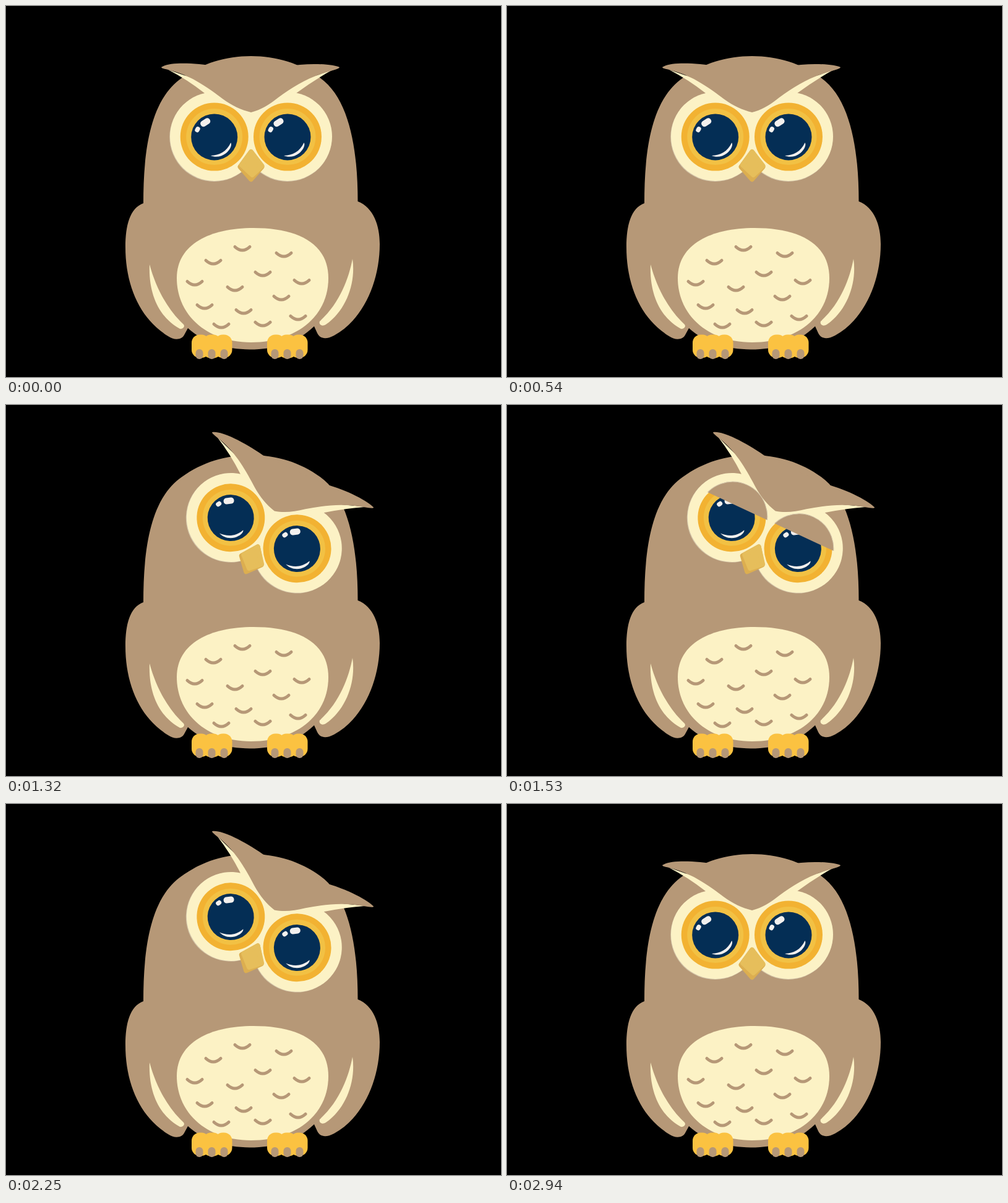
An HTML page for the animation above (3600 ms loop, 800 by 600 pixels).

```html
<!DOCTYPE html>
<html lang="en">
<head>
<meta charset="utf-8">
<title>Owl</title>
<style>
  html, body { margin: 0; width: 100%; height: 100%; overflow: hidden; background: #000; }
  svg { display: block; width: 100vw; height: 100vh; }
  .brown { fill: #b69877; }
  .cream { fill: #fcf2c5; }
  .rim { fill: #d3c4a9; }
  .foot { fill: #fbc241; }
  .shine { fill: #f3f0ee; }
  .plume { fill: none; stroke: #b69877; stroke-width: 5; stroke-linecap: round; }
  .lid { fill: #b69877; stroke: #d3c4a9; stroke-width: 1; }
  .beak { stroke-width: 8; stroke-linejoin: round; }
</style>
</head>
<body>
<svg viewBox="0 0 800 600">
  <defs>
    <clipPath id="lidClip"><rect id="lidRect" x="270" y="152" width="250" height="0"/></clipPath>
    <g id="eye">
      <circle r="55" fill="#f2b232"/>
      <circle r="45.5" fill="#f2c144"/>
      <circle cy="0.3" r="37.5" fill="#042e55"/>
      <rect class="shine" x="-8.5" y="-5" width="17" height="10" rx="4.6" transform="translate(-14.5 -23.4) rotate(-33)"/>
      <rect class="shine" x="-3.6" y="-4.6" width="7.200" height="9.200" rx="3.4" transform="translate(-27.200 -11.900) rotate(30)"/>
      <path class="shine" d="M-6 30.5C8 30 20 24 26.5 9.5C29 13 26 20.500 19 26.500C11 33 1 33.500 -6 30.500Z"/>
    </g>
    <g id="foot">
      <rect class="foot" x="300" y="531.500" width="29" height="37.500" rx="13"/>
      <rect class="foot" x="318" y="531.500" width="30" height="38" rx="13"/>
      <rect class="foot" x="337" y="531.500" width="28.500" height="37.500" rx="13"/>
      <rect class="brown" x="306.500" y="555" width="12" height="16" rx="5.800"/>
      <rect class="brown" x="326.500" y="555" width="12" height="16" rx="5.800"/>
      <rect class="brown" x="346.500" y="555" width="12" height="16" rx="5.800"/>
    </g>
  </defs>
  <rect width="800" height="600"/>

  <path class="brown" d="M222 319C222 240 231 153 284 116.500C317 92.500 355 81 396 81C437 81 475 92.500 508 116.500
    C556 151 568.500 235 568.500 316C594 326 604 355 604 385C604 445 578 507 530 533
    C517 540 507 538 503 529L498 518C470 545 435 555.500 394 555.500C355 555 320 545 294 521L288 532
    C284 540 272 541 262 534C215 505 193 450 193 390C193 355 200 327 222 319Z"/>
  <path class="cream" d="M400 359C470 359 521 383 521 440C521 505 465 544 396 544C325 544 276 500 276 440C276 385 330 359 400 359Z"/>
  <path class="cream" d="M232 418C242 455 260 490 287 515C290 519 285 523 281 522C250 505 230 470 232 418Z"/>
  <path class="cream" d="M560 409C554 440 540 480 507 510C505 515 511 519 517 515C548 494 566 450 560 409Z"/>
  <g id="plumes"></g>
  <use href="#foot"/>
  <use href="#foot" x="122"/>

  <g id="face">
    <path class="cream" d="M262 103Q293 119 321 141L396 185L469 141Q499 119 528 103L396 150Z"/>
    <circle class="rim" cx="336.300" cy="212" r="72"/>
    <circle class="rim" cx="454.500" cy="212" r="72"/>
    <circle class="cream" cx="337" cy="211" r="72"/>
    <circle class="cream" cx="455" cy="211" r="72"/>
    <use href="#eye" x="336.700" y="211.600"/>
    <use href="#eye" x="455" y="211.600"/>
    <g clip-path="url(#lidClip)">
      <circle class="lid" cx="337" cy="209" r="56"/>
      <circle class="lid" cx="455.900" cy="210.700" r="56"/>
    </g>
    <path class="brown" d="M251 99C262 91 300 91 341 98L451 98C490 91 528 94 539 99C539 101 532 103 525 105
      C490 114 465 130 440 148C425 160 412 168 396 172C380 168 365 161 350 150C330 135 300 112 265 104C258 102 251 101 251 99Z"/>
    <path class="beak" fill="#dcae50" stroke="#dcae50" d="M396 236L413.500 260L396 280L378.500 260Z"/>
    <path class="beak" fill="#e6be5b" stroke="#e6be5b" d="M396 236L413.500 258.500L398 273L381 257Z"/>
  </g>
</svg>
<script>
  const LOOP = 3600, STEP = 30;
  const LID_HEIGHT = 116, TILT = 25;
  const face = document.getElementById('face');
  const lidRect = document.getElementById('lidRect');

  const plumes = [[382, 391], [335, 413], [449, 401], [415, 432], [305, 447], [370, 456], [478, 445],
    [445, 471], [321, 485], [384, 493], [348, 516], [415, 513], [472, 503]];
  document.getElementById('plumes').innerHTML = plumes.map(([x, y]) =>
    `<path class="plume" d="M${x - 12} ${y - 1.5}q12 11 24 0"/>`).join('');

  // Start of closing and time spent shut
  const blinks = [[360, 0], [1350, 30], [1710, 0], [2760, 0]];
  const CLOSE = 90;

  const clamp = v => Math.min(1, Math.max(0, v));
  const ease = v => (1 - Math.cos(Math.PI * clamp(v))) / 2;

  function lidAt(t) {
    return Math.max(...blinks.map(([start, hold]) => {
      const end = start + 2 * CLOSE + hold;
      return clamp(Math.min(t - start, end - t) / CLOSE);
    }));
  }

  function tiltAt(t) {
    return TILT * (ease((t - 600) / 150) - ease((t - 2520) / 150));
  }

  function draw(now) {
    const t = Math.floor((now % LOOP) / STEP) * STEP;
    face.setAttribute('transform', `rotate(${tiltAt(t)} 416 257)`);
    lidRect.setAttribute('height', LID_HEIGHT * lidAt(t));
  }

  const start = performance.now();
  function frame() {
    draw(performance.now() - start);
    requestAnimationFrame(frame);
  }
  frame();
</script>
</body>
</html>
```
